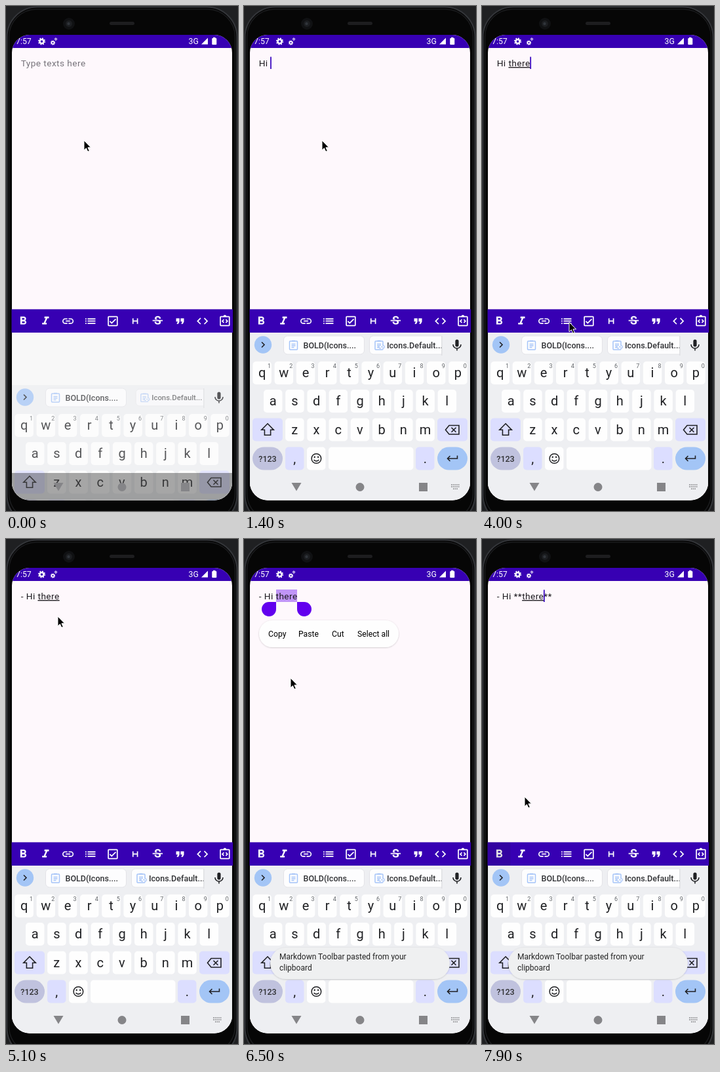
Recreate the animation shown at these times as an HTML page. Size 354 px wide and 770 px high, loop 8000 ms.

```html
<!DOCTYPE html>
<html lang="en">
<head>
<meta charset="utf-8">
<title>Markdown editor demo</title>
<style>
html, body { margin: 0; width: 100%; height: 100%; overflow: hidden; background: #1f2022; }
svg { display: block; width: 354px; height: 770px; font-family: Roboto, sans-serif; }
text { white-space: pre; }
.body { font-size: 13.68px; letter-spacing: .43px; fill: #1d1b20; }
.key { font-size: 20px; text-anchor: middle; fill: #202124; }
.hint { font-size: 9px; text-anchor: middle; fill: #5f6368; }
.chip { font-size: 12.5px; font-weight: 500; fill: #303134; }
.line { fill: none; stroke: #202124; stroke-width: 1.6; }
</style>
</head>
<body>
<svg id="stage" viewBox="0 0 354 770"></svg>
<script>
const rect = (x, y, w, h, fill, r = 0, extra = '') =>
  `<rect x="${x}" y="${y}" width="${w}" height="${h}" rx="${r}" fill="${fill}" ${extra}/>`;
const circle = (x, y, r, fill, extra = '') => `<circle cx="${x}" cy="${y}" r="${r}" fill="${fill}" ${extra}/>`;
const text = (x, y, s, cls, extra = '') => `<text x="${x}" y="${y}" class="${cls}" ${extra}>${s}</text>`;
const line = (d, extra = '') => `<path class="line" d="${d}" ${extra}/>`;
const group = (id, content, extra = '') => `<g id="${id}" ${extra}>${content}</g>`;

// Toolbar glyphs on a 24-unit grid
const icons = [
  'M15.6 10.79c.97-.67 1.65-1.77 1.65-2.79 0-2.26-1.75-4-4-4H7v14h7.04c2.09 0 3.71-1.7 3.71-3.79 0-1.52-.86-2.82-2.15-3.42zM10 6.5h3c.83 0 1.5.67 1.5 1.5s-.67 1.5-1.5 1.5h-3zm3.5 9H10v-3h3.5c.83 0 1.5.67 1.5 1.5s-.67 1.5-1.5 1.5z',
  'M10 4v3h2.21l-3.42 8H6v3h8v-3h-2.21l3.42-8H18V4z',
  'M3.9 12c0-1.71 1.39-3.1 3.1-3.1h4V7H7a5 5 0 0 0 0 10h4v-1.9H7c-1.71 0-3.1-1.39-3.1-3.1zM8 13h8v-2H8zm9-6h-4v1.9h4a3.1 3.1 0 0 1 0 6.2h-4V17h4a5 5 0 0 0 0-10z',
  'M3 13h2v-2H3zm0 4h2v-2H3zm0-8h2V7H3zm4 4h14v-2H7zm0 4h14v-2H7zM7 7v2h14V7z',
  'M19 3H5a2 2 0 0 0-2 2v14a2 2 0 0 0 2 2h14a2 2 0 0 0 2-2V5a2 2 0 0 0-2-2zm0 16H5V5h14zM18 9l-1.4-1.4-6.6 6.6-2.6-2.6L6 13l4 4z',
  'M7 7v10h2v-4h6v4h2V7h-2v4H9V7z',
  'M6.85 7.08C6.85 4.37 9.45 3 12.24 3c1.64 0 3 .49 3.9 1.28.77.65 1.46 1.73 1.46 3.24h-3.01c0-.31-.05-.59-.15-.85-.29-.86-1.2-1.28-2.25-1.28-1.86 0-2.34 1.02-2.34 1.7 0 .48.25.88.74 1.21.38.25.77.48 1.41.7H7.39c-.21-.34-.54-.89-.54-1.92zM21 12v-2H3v2h9.62c1.15.45 1.96.75 1.96 1.97 0 1-.81 1.67-2.28 1.67-1.54 0-2.93-.54-2.93-2.51H6.4c0 .55.08 1.13.24 1.58.81 2.29 3.29 3.3 5.67 3.3 2.27 0 5.3-.89 5.3-4.05 0-.3-.01-1.16-.48-1.94H21z',
  'M6 17h3l2-4V7H5v6h3zm8 0h3l2-4V7h-6v6h3z',
  'M9.4 16.6 4.8 12l4.6-4.6L8 6l-6 6 6 6zm5.2 0 4.6-4.6-4.6-4.6L16 6l6 6-6 6z',
  'M19 3h-4.2a3 3 0 0 0-5.6 0H5a2 2 0 0 0-2 2v14a2 2 0 0 0 2 2h14a2 2 0 0 0 2-2V5a2 2 0 0 0-2-2zm0 16H5V5h14zM11 14.2 8.8 12 11 9.8 9.6 8.4 6 12l3.6 3.6zm2 0 2.2-2.2L13 9.8l1.4-1.4L18 12l-3.6 3.6z'
];
const toolbar = rect(8.5, 462.4, 337.8, 35.6, '#3700b3') +
  icons.map((d, i) => `<path fill="#fff" fill-rule="evenodd" d="${d}"
    transform="translate(${15.9 + i * 34.2} 470.2) scale(.855)"/>`).join('') +
  rect(9, 462.4, 34.2, 35.6, '#1d1b20', 0, 'id="press"');

const gear = (x, y, s) => `<g transform="translate(${x} ${y}) scale(${s})" fill="none" stroke="#fff">
  <circle r="3" stroke-width="2.4"/><circle r="4.6" stroke-width="2" stroke-dasharray="1.8 1.81"/></g>`;
const status = rect(9, 44, 336, 20, '#3700b3') +
  text(15, 58, '7:57', '', 'fill="#fff" font-size="12.3"') +
  gear(54.5, 54, 1) + gear(71.5, 56, .65) + gear(76, 50.5, .4) +
  text(278.5, 58, '3G', '', 'fill="#fff" font-size="12.3"') +
  '<path d="M308 48.5V58.5H298z" fill="#fff"/>' +
  rect(314.3, 49, 7, 10, '#fff', 1) + rect(316, 47.8, 3.5, 2, '#fff');

const clipboard = x => `<g fill="none" stroke="#a5c4f8" stroke-width="1.5">
  <rect x="${x}" y="511" width="12" height="13" rx="1"/><path d="M${x + 3.5} 510.5h5M${x + 3} 515.5h6m-6 2.5h6m-6 2.5h4"/></g>`;
const chipBox = (x, w) => rect(x, 503, w, 28, '#fdfdfe', 6, 'stroke="#dfdfe4" stroke-width=".8"');
const suggestions = circle(29, 516.5, 13.2, '#a3c5f6') + line('M27 512.5l4 4-4 4') +
  chipBox(60.5, 123) + clipboard(69.5) + text(90.5, 521.5, 'BOLD(Icons....', 'chip') +
  `<g clip-path="url(#chipClip)"><g id="chip2">${chipBox(191.5, 140)}${clipboard(200)}` +
  rect(206, 517, 8, 6, '#fdfdfe') +
  line('M209 517.5h-1a2.2 2.2 0 0 0 0 4.4h1m2-4.4h1a2.2 2.2 0 0 1 0 4.4h-1m-2-2.2h3', 'style="stroke:#a5c4f8;stroke-width:1.2"') +
  text(218, 521.5, 'Icons.Default...', 'chip') + '</g></g>' +
  rect(301.5, 503, .8, 30, '#cfcfd4') +
  rect(322.4, 508.5, 5.2, 11, '#202124', 2.6) + line('M319 516a6 6 0 0 0 12 0M325 522v3.5');

const pitch = 33.2;
const keyBox = (x, y, w = 28.5, fill = '#fefefe', r = 5) => rect(x, y, w, 35, fill, r);
const row = (letters, x0, y, hints) => [...letters].map((c, i) => {
  const x = x0 + i * pitch;
  return keyBox(x - 14.2, y) + text(x, y + 24.3, c, 'key') +
    (hints ? text(x + 11, y + 9.5, (i + 1) % 10, 'hint') : '');
}).join('');
const special = '#dcdeff';
const keys = row('qwertyuiop', 27.6, 542, true) + row('asdfghjkl', 44.2, 585) + row('zxcvbnm', 77.3, 628.5) +
  keyBox(13, 628.5, 46, special) + line('M36 636.8l9.2 9.4h-4.6v8h-9.2v-8h-4.6z') +
  keyBox(295, 628.5, 46, special) +
  line('M313 639.5h15v13.5h-15l-5.5-6.7zM316.5 642.7l7 7m0-7l-7 7') +
  keyBox(13, 672.5, 46, '#c0c2de', 17.5) + text(36, 694.5, '?123', 'chip', 'text-anchor="middle"') +
  keyBox(63, 672.5, 28.5, special) + text(77.3, 697, ',', 'key') +
  keyBox(96, 672.5) + circle(110.4, 690, 7.3, 'none', 'stroke="#202124" stroke-width="1.5"') +
  circle(107.7, 687.8, 1.2, '#202124') + circle(113.1, 687.8, 1.2, '#202124') +
  line('M106.6 691.8a4.2 3.6 0 0 0 7.6 0') +
  keyBox(129, 672.5, 129.5) +
  keyBox(262, 672.5, 28.5, special) + text(276.5, 697, '.', 'key') +
  keyBox(295, 672.5, 46, '#a3c5f6', 17.5) + line('M325.5 685.5v4.5h-15m4-4l-4 4 4 4');
const keyboard = group('keyboard', rect(9, 498, 336, 256, '#eeeff2') + suggestions + keys);

const nav = rect(9, 712, 336, 42, '#000', 0, 'id="navShade"') +
  `<g fill="#858588"><path d="M72.5 727h15L80 739.5z"/><circle cx="177" cy="733.5" r="6.5"/>
  <rect x="267" y="727" width="13" height="13"/>
  <path id="switcher" d="M316 730h13m-13 3h13m-10 3.3h7" stroke="#858588" stroke-width="1.6" stroke-dasharray="1.7 1"/></g>`;

const handles = '<path d="M49 96V106.8a11 11 0 1 1-11-10.8zM81 96V106.8a11 11 0 1 0 11-10.8z" fill="#6200ee"/>';
const menu = group('menu', rect(23, 124, 213, 41, '#fefefe', 20.5, 'filter="url(#shadow)"') +
  [[37, 'Copy'], [83, 'Paste'], [134, 'Cut'], [173, 'Select all']]
    .map(([x, s]) => text(x, 149.3, s, '', 'font-size="12.2"')).join(''));
const toast = group('toast', rect(40, 623, 274, 48, '#eff0f1', 24, 'filter="url(#shadow)"') +
  text(54, 641, 'Markdown Toolbar pasted from your', '', 'font-size="12" fill="#222"') +
  text(54, 658, 'clipboard', '', 'font-size="12" fill="#222"'));

const phone = rect(0, 0, 354, 770, '#1f2022') +
  rect(1.5, 1.5, 351, 790, '#060606', 46, 'stroke="#34363a" stroke-width="2"') +
  rect(4.5, 5, 345, 780, 'none', 42, 'stroke="#1b1c1e" stroke-width="1.5"') +
  circle(96, 27, 9, '#101113') + circle(96, 27, 5, '#1c1e21') + circle(95.5, 27, 2.2, '#30343a') +
  rect(158, 24, 38, 5, '#1d1d1f', 2.5);

const $ = id => document.getElementById(id);
$('stage').innerHTML = `<defs>
  <clipPath id="screen"><rect x="9" y="44" width="336" height="709.5" rx="27"/></clipPath>
  <clipPath id="chipClip"><rect x="186" y="495" width="115.5" height="45"/></clipPath>
  <filter id="shadow" x="-10%" y="-30%" width="120%" height="160%">
    <feDropShadow dx="0" dy=".6" stdDeviation="1" flood-opacity=".22"/></filter></defs>` +
  phone + '<g clip-path="url(#screen)">' + rect(9, 44, 336, 710, '#fef8fc') + status +
  group('selection', rect(49, 77, 32, 19, '#6200ee', 0, 'opacity=".4"') + handles) +
  text(22.7, 92, '', 'body', 'id="note"') + rect(0, 77.5, 1.8, 18.5, '#3d0cc0', 0, 'id="caret"') +
  rect(9, 498, 336, 256, '#f8f8f8') + keyboard + nav + menu + toast + '</g>' + toolbar +
  '<path id="mouse" d="M0 0v14.8l3.4-3.1 2.4 5.4 2.5-1.1-2.4-5.2h4.6z" fill="#000" stroke="#fff" stroke-width="1"/>';

// [time, finished text, text still being composed, text after it]
const edits = [
  [700, '', 'H'], [1100, '', 'Hi'], [1300, 'Hi ', ''], [2000, 'Hi ', 't'], [2200, 'Hi ', 'th'],
  [2400, 'Hi ', 'the'], [2500, 'Hi ', 'ther'], [2700, 'Hi ', 'there'], [4400, '- Hi ', 'there'],
  [5700, '- Hi there', ''], [7600, '- Hi **', 'there', '**']
];
const pointer = [
  [3100, 119, 205], [3900, 133, 482], [4400, 133, 482], [5100, 79, 118], [5500, 63, 88],
  [6100, 63, 88], [6500, 71, 212], [7100, 27, 476], [7500, 27, 476], [7900, 65, 393]
];

const clamp = v => Math.min(1, Math.max(0, v));
const ease = v => v * v * (3 - 2 * v);
const show = (id, opacity) => $(id).setAttribute('opacity', +opacity);

function mouseAt(t) {
  let [, x, y] = pointer[0];
  for (let i = 1; i < pointer.length; i++) {
    const [t0, x0, y0] = pointer[i - 1], [t1, x1, y1] = pointer[i];
    if (t < t0) break;
    const k = ease(clamp((t - t0) / (t1 - t0)));
    x = x0 + (x1 - x0) * k;
    y = y0 + (y1 - y0) * k;
  }
  return `${x} ${y}`;
}

function drawNote(t) {
  const edit = edits.filter(e => e[0] <= t).pop();
  const [start, done, composing, after = ''] = edit || [100, '', ''];
  const note = $('note');
  note.innerHTML = edit
    ? `${done}<tspan text-decoration="underline">${composing}</tspan>${after}`
    : '<tspan fill="#77747b">Type texts here</tspan>';
  const count = done.length + composing.length;
  const width = count ? note.getSubStringLength(0, count) : 0;
  $('caret').setAttribute('x', 22.7 + width - (count ? .4 : 0));
  const selected = t >= 5700 && t < 7600;
  const blinkOn = !edit || (t - start) % 1000 < 500;
  show('caret', t >= 100 && !selected && blinkOn);
  show('selection', selected);
  show('menu', selected * clamp((t - 5700) / 200));
}

function draw(t) {
  const rising = t < 100;
  $('keyboard').setAttribute('transform', `translate(0 ${rising ? 80 : 0})`);
  show('keyboard', rising ? .75 : 1);
  $('chip2').setAttribute('transform', rising ? 'translate(265 517) scale(.91) translate(-265 -517)' : '');
  show('chip2', rising ? .75 : 1);
  show('navShade', rising ? .34 : 0);
  show('switcher', !rising);
  drawNote(t);
  show('toast', clamp((t - 5800) / 300));
  show('press', t >= 7600 ? .12 : 0);
  $('mouse').setAttribute('transform', `translate(${mouseAt(t)})`);
}

function tick() {
  draw(Math.floor(performance.now() % 8000 / 100) * 100);
  requestAnimationFrame(tick);
}
tick();
</script>
</body>
</html>
```
